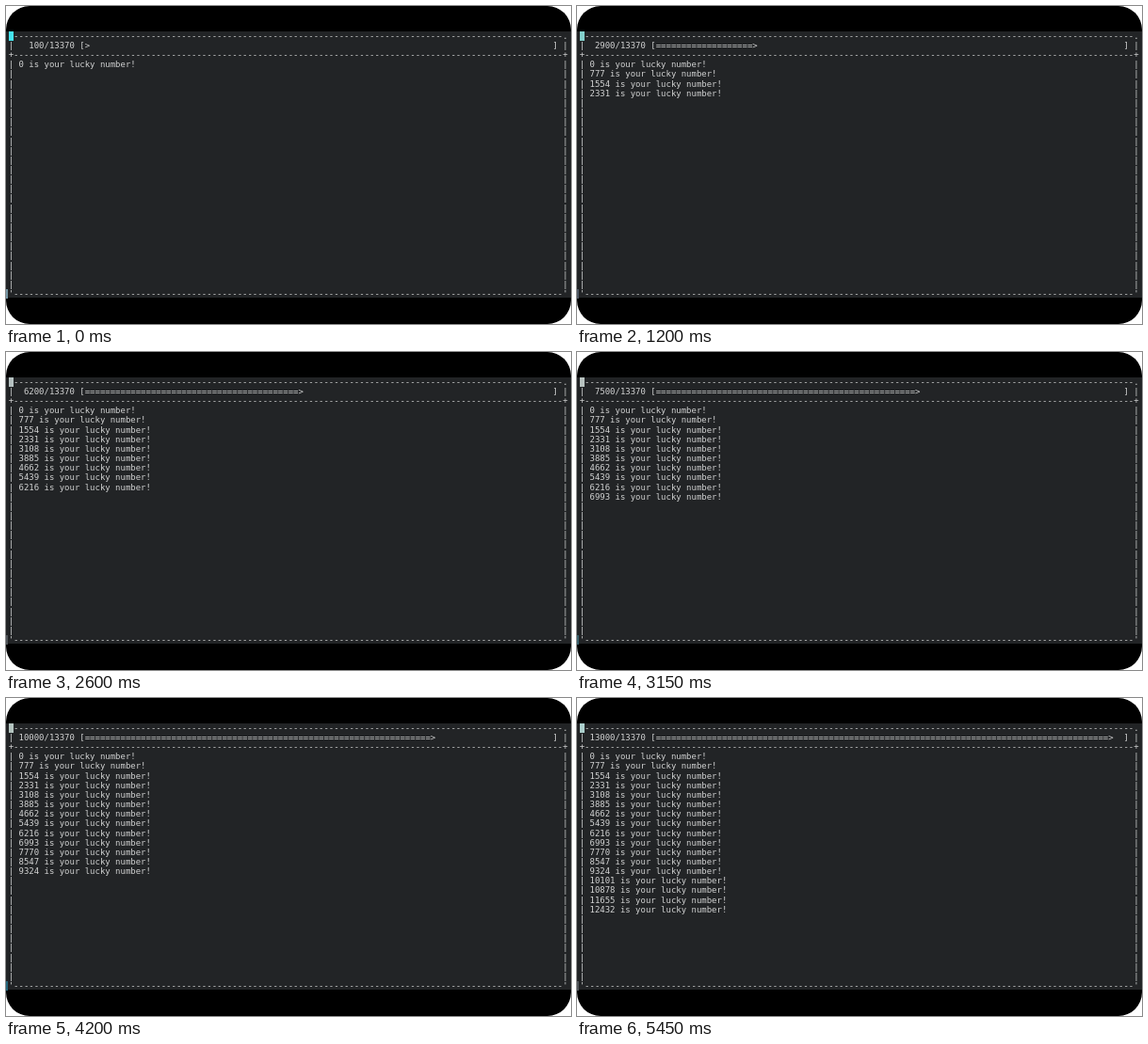
An HTML page that plays this animation: 600x338 px, repeating every 5.5 s.

```html
<!DOCTYPE html>
<html lang="en">
<head>
<meta charset="utf-8">
<title>Lucky numbers</title>
<style>
  html, body { margin: 0; width: 100%; height: 100%; overflow: hidden; background: #fff; }
  #stage { position: absolute; left: 0; top: 0; width: 600px; height: 338px; overflow: hidden; border-radius: 25px; background: #000; }
  #terminal { position: absolute; left: 0; top: 27px; width: 600px; height: 283px; background: #222426; }
  #screen {
    position: absolute; left: 2.7px; top: 26.8px; margin: 0; color: #d2d3d3;
    font: 8.97px/10.15px "DejaVu Sans Mono", monospace; font-variant-ligatures: none; white-space: pre;
  }
  #cursor { position: absolute; left: 2.7px; top: 27px; width: 5.4px; height: 10px; }
  #edge { position: absolute; left: 0; top: 301px; width: 2.4px; height: 9.5px; }
</style>
</head>
<body>
<div id="stage">
  <div id="terminal"></div>
  <pre id="screen"></pre>
  <div id="cursor"></div>
  <div id="edge"></div>
</div>
<script>
const LOOP = 5500, TICK = 50;
const COLS = 110, BODY_ROWS = 24, BAR = 92;
const TOTAL = 13370, LUCKY = 777;
const FIRST = 127, PER_TICK = 118.6;

const cursor = document.getElementById('cursor');
const edge = document.getElementById('edge');
const screen = document.getElementById('screen');

// time, cursor colour, colour at the lower left edge
const tints = [
  [0, '#45e4ef', '#7595a3'],
  [1200, '#83d0cc', '#4e5763'],
  [1900, '#7dd2d6', '#1f485c'],
  [2600, '#b5c1c1', '#505559'],
  [3700, '#b8c3be', '#1e667b'],
  [4650, '#aec5bf', '#2c687c'],
  [5450, '#abcfcc', '#505559'],
  [LOOP, '#abcfcc', '#505559']
];

const row = text => '| ' + text.padEnd(COLS - 4) + ' |';
const rule = end => end + '-'.repeat(COLS - 2) + end;

function render(n) {
  const count = Math.floor(n / 100) * 100;
  const bar = '='.repeat(Math.floor(count / TOTAL * BAR)) + '>';
  const body = Array.from({ length: BODY_ROWS }, (_, i) =>
    row(i * LUCKY <= n ? `${i * LUCKY} is your lucky number!` : ''));
  return [
    rule('.'),
    row(`${String(count).padStart(5)}/${TOTAL} [${bar.padEnd(BAR)}]`),
    rule('+'),
    ...body,
    rule("'")
  ].join('\n');
}

function tint(element, column) {
  const frames = tints.map(t => ({ offset: t[0] / LOOP, backgroundColor: t[column] }));
  const animation = element.animate(frames, { duration: LOOP, iterations: Infinity });
  animation.startTime = 0;
}

let shown = -1;
function draw() {
  const tick = Math.floor(performance.now() % LOOP / TICK);
  if (tick !== shown) {
    shown = tick;
    screen.textContent = render(FIRST + PER_TICK * tick);
  }
  requestAnimationFrame(draw);
}

tint(cursor, 1);
tint(edge, 2);
draw();
</script>
</body>
</html>
```
